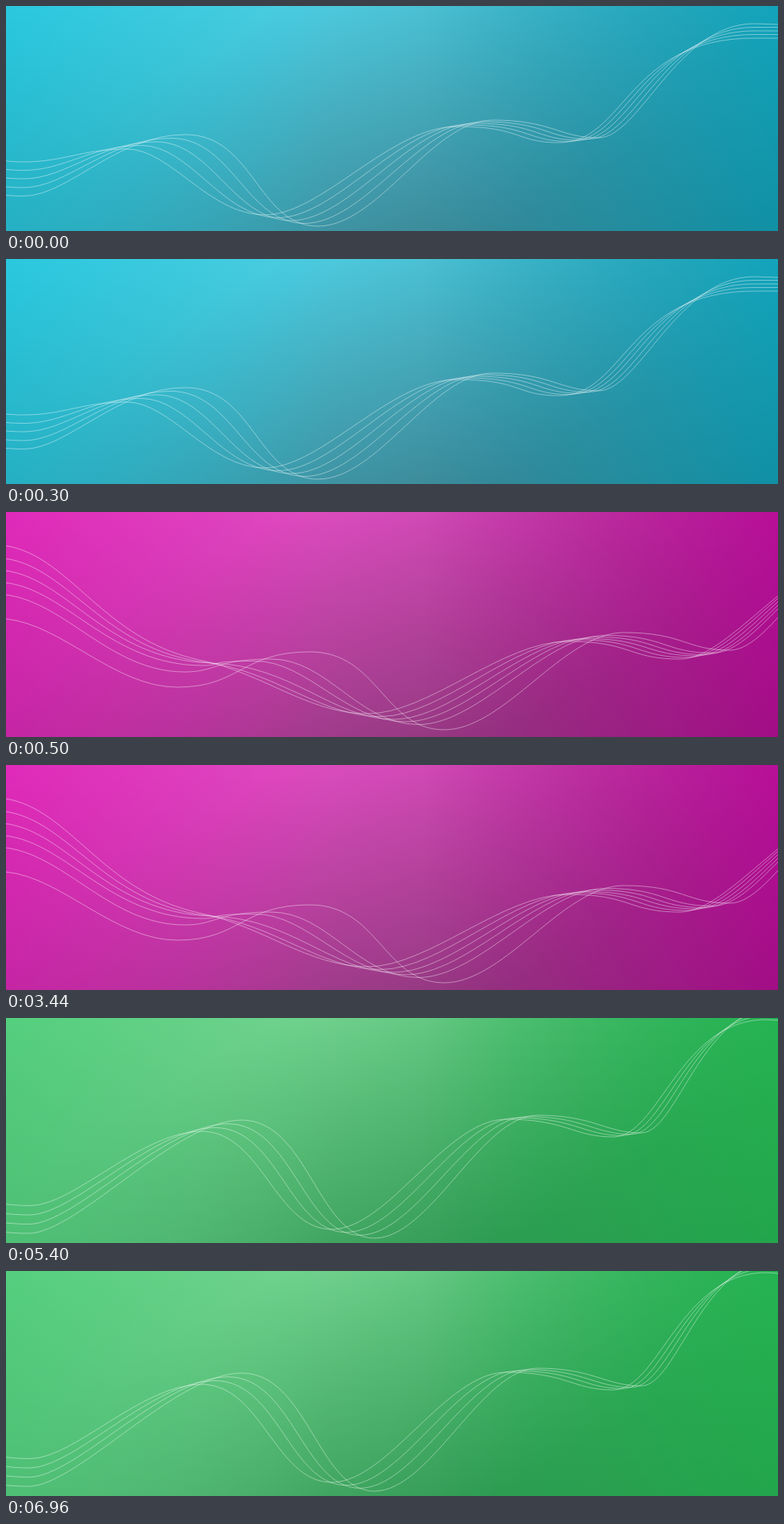
These frames come from a looping animation (960x280 px, 8 s). An HTML page without scripts:

```html
<!DOCTYPE html>
<html lang="en">
<head>
<meta charset="utf-8">
<title>Waves</title>
<style>
html, body { margin: 0; width: 100%; height: 100%; overflow: hidden; }

svg {
  position: absolute;
  inset: 0;
  width: 960px;
  height: 280px;
  fill: none;
  stroke: #fff;
  stroke-opacity: .45;
  stroke-width: .9;
  background:
    linear-gradient(transparent, var(--dusk)),
    linear-gradient(90deg, var(--left), transparent 42%),
    linear-gradient(270deg, var(--right), transparent 46%),
    linear-gradient(150deg, var(--glow) 24%, var(--shade) 76%);
}

.teal { --left: #2ac8de; --right: #12a4bb; --glow: #4dcce0; --shade: #4499aa; --dusk: #0000001f; }
.pink { --left: #e02aba; --right: #b80f98; --glow: #de4cc0; --shade: #a4408f; --dusk: #0000001f; }
.green { --left: #54cf7e; --right: #25b352; --glow: #72d28e; --shade: #34a75a; --dusk: #00000014; }

/* Scenes are stacked; each upper one hides to reveal the next */
.teal { animation: first 8s step-end infinite; }
.pink { animation: second 8s step-end infinite; }
@keyframes first { 0% { visibility: visible; } 6.25%, 100% { visibility: hidden; } }
@keyframes second { 0% { visibility: visible; } 67.5%, 100% { visibility: hidden; } }
</style>
</head>
<body>

<svg class="green" viewBox="0 0 960 280">
  <path d="M-82 217C-42 217-25 233.5 30 233.5S168 141 243 141 335 263 405 263 547 126 622 126 705 148 755 148C812 148 838 2 945 2L962 3"/>
  <path d="M-82 229C-42 229-27 245 29 245S182 136.5 260 136.5 353 266.7 423 266.7 562 124.3 635 124.3 718 146.3 767 146.3C820 146.3 847-4 952-4"/>
  <path d="M-82 240C-42 240-29 256.5 28.5 256.5S196 131.7 276 131.7 370 270.3 440 270.3 577 122.7 648 122.7 731 144.7 778 144.7C827 144.7 856-10 958-10"/>
  <path d="M-82 252C-42 252-32 268 28 268S211 127 293 127 388 274 458 274 591 121 661 121 745 143 790 143 865-16 965-16"/>
</svg>

<svg class="pink" viewBox="0 0 960 280">
  <path d="M0 42C80 55 120 158 240 184C320 200 375 251 450 251S618 161 698 161 773 183 838 183 985 45 1085 45"/>
  <path d="M0 58C79 70 123 172 248 187C335 198 391 254.5 466 254.5S632 159 710 159 784 181 848 181 990 42 1088 42"/>
  <path d="M0 73C78 84 125 184 255 188C355 190 407 258 482 258S645 157.5 721 157.5 796 179 859 179 995 39 1091 39"/>
  <path d="M0 88C77 98 130 191 245 191C270 191 245 185.5 310 185.5S422 261 497 261 658 155.5 733 155.5 807 177.5 869 177.5 1000 36 1094 36"/>
  <path d="M0 103C75 113 130 199 222 199C262 199 260 183 330 183S438 264.5 513 264.5 670 153.5 745 153.5 819 175.5 879 175.5 1005 33 1097 33"/>
  <path d="M0 133C70 140 135 218 213 218S293 174 378 174 470 271 545 271 693 150 768 150 845 172 900 172 1010 30 1100 30"/>
</svg>

<svg class="teal" viewBox="0 0 960 280">
  <path d="M-90 178C-50 178-28 194 22 194S95 178 150 178 252 260 322 260 478 150 560 150 633 170 688 170C770 170 772 40 930 40H962"/>
  <path d="M-90 188C-50 188-29 204.5 22 204.5S106 173.5 168 173.5 268 263.5 338.5 263.5 491 148 571 148 647 168.5 700 168.5C774 168.5 788 35.5 930 35.5H962"/>
  <path d="M-90 199C-50 199-30 215 22 215S117 169 186.5 169 283 267 355 267 504 146 582.5 146 660 167 712.5 167C778 167 803 31 930 31H962"/>
  <path d="M-90 210C-50 210-31 226 22 226S128 164.5 205 164.5 298 270.5 371.5 270.5 517 144 594 144 673 165.5 725 165.5C783 165.5 819 26.5 930 26.5H962"/>
  <path d="M-90 220C-50 220-33 236.5 22 236.5S138 160 223 160 313 274 388 274 530 142 605 142 687 164 737 164 835 22 930 22L962 23"/>
</svg>

</body>
</html>
```
